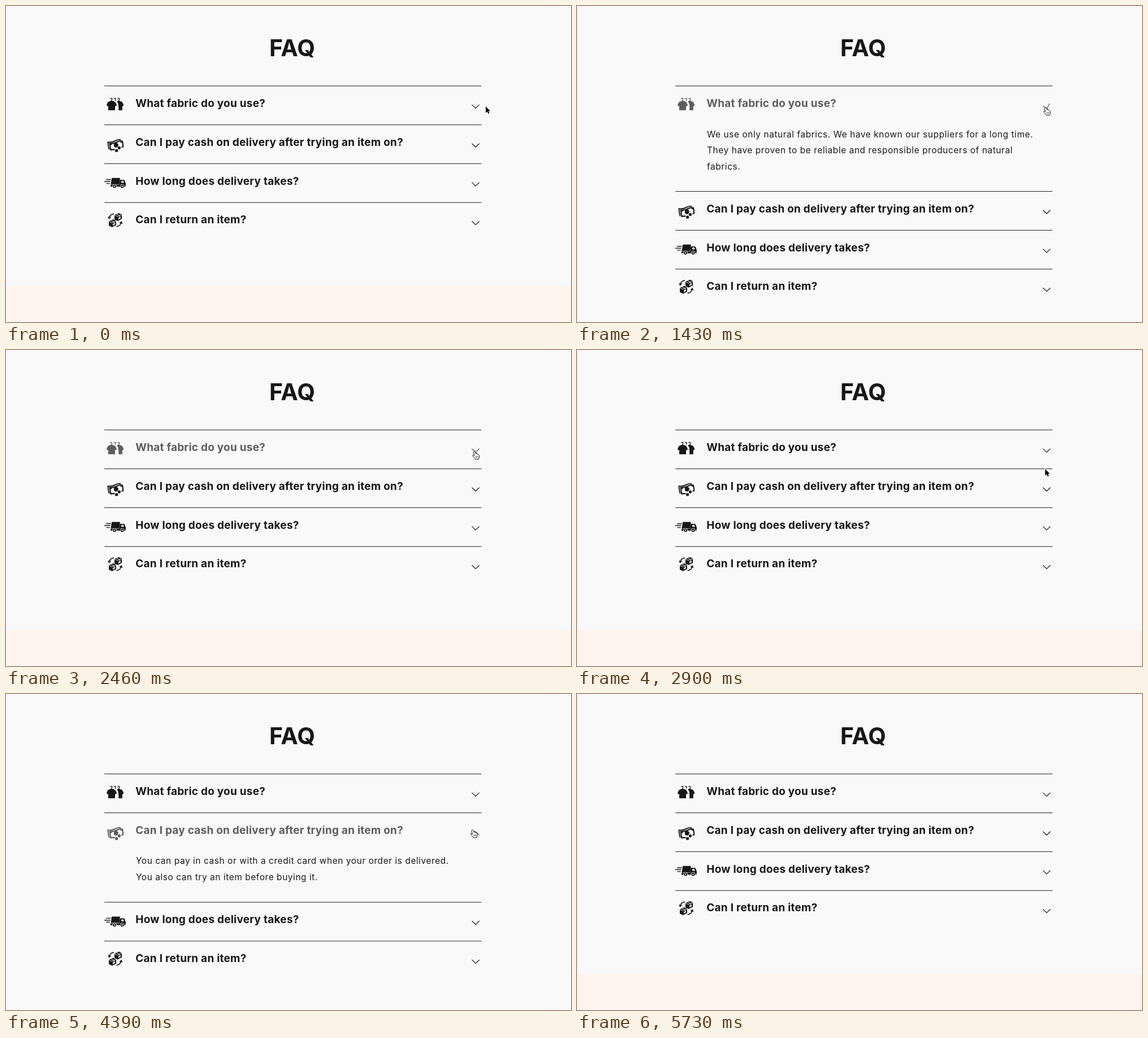
Write an HTML page that moves like this. It is 1000x560 px and loops after 6.24 s.

```html
<!DOCTYPE html>
<html lang="en">
<head>
<meta charset="utf-8">
<title>FAQ accordion</title>
<style>
  html, body { margin: 0; width: 100%; height: 100%; overflow: hidden; background: #f9f9f9; }
  svg { display: block; width: 1000px; height: 560px; }
  text { font-family: Inter, "Liberation Sans", sans-serif; font-optical-sizing: none; }
  .title { font-size: 41px; font-weight: 700; fill: #171717; }
  .question { font-size: 19px; font-weight: 700; letter-spacing: .23px; fill: currentColor; }
  .answer { font-size: 15.5px; letter-spacing: .54px; fill: #1a1a1a; }
  .icon { fill: currentColor; }
  .pen { fill: none; stroke: currentColor; }
  .cut { fill: #f9f9f9; }
  .cutPen { fill: none; stroke: #f9f9f9; }
  .chevron { fill: none; stroke: currentColor; stroke-width: 1.2; }
</style>
</head>
<body>
<svg viewBox="0 0 1000 560">
  <defs>
    <path id="hook" class="pen" stroke-width="1.3" d="M184.6 165a1.6 1.5 0 1 1 2.6 1.1l-.7 1.6"/>
    <g id="box">
      <path d="M0 3.4L7.6 0L13 2.6V10.2L5.6 14L0 11.2Z"/>
      <path class="cutPen" stroke-width=".9" d="M.4 3.8L5.5 6L12.6 3M3.8 2L9.4 4.4V7.2"/>
      <path class="cut" d="M7 8.2l3.8-1.8v2.8l-3.8 1.9z"/>
    </g>
    <g id="turn">
      <path class="pen" stroke-width="1.7" d="M191 368.3C186.6 368.8 184 371 183 374.8"/>
      <path d="M180.2 373.2l6 1.1l-4 3.8z"/>
    </g>
    <g id="wheel">
      <circle class="cut" r="3.8"/><circle r="3"/><circle class="cut" r="1.2"/>
    </g>

    <g id="icon0">
      <use href="#hook"/><use href="#hook" x="6.6"/><use href="#hook" x="13.2"/>
      <path d="M187 167.4l4.6 1.8q3 1 4.4 7.2l-3 1.4v7h-12v-7l-3-1.4q1.2-6.2 4.4-7.2z"/>
      <path d="M196.4 168.8l2.8-1.4 4.8 1.8q3 1 4.2 7.2l-2.4 1.4v7h-6.6v-7.4q-.3-5.4-2.8-8.6z"/>
    </g>
    <g id="icon1">
      <path class="pen" stroke-width="1.9" d="M182.6 254.4q-2-6.4-2.2-13.2q8 .8 13.4-2.6q4.6-2.4 9.4-1.4"/>
      <path class="pen" stroke-width="2.2" d="M193.6 255q-3.6-1.3-8.2 0q-1.4-6.4-1.6-11.4q7 .8 12.4-2.4q5-2.8 9.6-1.6q1.6 5 1.2 10l-2.6 .4"/>
      <path d="M185 246.4q3.2-.4 3.6-3l-4 .2zM201.6 240.4q1.4 2.4 4.6 1.6l-.6-2.6z"/>
      <circle cx="194.8" cy="246.8" r="4"/>
      <circle class="cut" cx="200.4" cy="251.4" r="3.5"/><circle cx="200.4" cy="251.4" r="2.6"/>
      <circle class="cut" cx="195.6" cy="256.2" r="3.4"/><circle cx="195.6" cy="256.2" r="2.6"/>
    </g>
    <g id="icon2">
      <path class="pen" stroke-width="1.4" d="M177 307.8h8.6M174 311.2h10.6M177.4 314.6h6.4"/>
      <path d="M187.2 304.8h14.6l-1.3 11.2h-15z"/>
      <path d="M185.2 316.6h15.4l1-8.6h6.4q1.8 0 2.3 1.8l.9 3 .9 2.2-.7 5.2h-26.6z"/>
      <path class="cut" d="M204.4 309.8h3.2l1.3 3.4h-5z"/>
      <use href="#wheel" x="192" y="319.6"/><use href="#wheel" x="205.6" y="319.6"/>
    </g>
    <g id="icon3">
      <use href="#box" x="192" y="367"/><use href="#box" x="182" y="378"/>
      <use href="#turn"/><use href="#turn" transform="rotate(180 193.3 379.6)"/>
    </g>
  </defs>

  <rect width="1000" height="560" fill="#f9f9f9"/>
  <rect id="band" y="496" width="1000" height="200" fill="#fff5ef"/>
  <text class="title" x="466" y="88.5">FAQ</text>
  <g id="rows"></g>
  <path id="arrow" d="M0 0V11.5L2.7 9L4.6 13L6.6 12.1L4.8 8.3H8.4Z" fill="#000" stroke="#fff" stroke-width="1.6" paint-order="stroke"/>
  <g id="hand" stroke="#111" stroke-linejoin="round">
    <path fill="#fff" d="M-1.6 1.4Q-1.4-.5 .2-.4Q1.4-.2 1.7 1.2L2.6 4.2Q4-.2 4.8 4.6Q6.2 4.2 6.8 5.4Q8.2 5.2 8.5 6.6Q9.2 9 8.4 11L7.6 13.6H1.6Q.4 11.6-1.6 9.4Q-3.8 7-2.6 6.2Q-1.6 5.8 0 7.4Z"/>
    <path fill="none" stroke-width=".8" d="M2.4 8.4l.3 2.6M4.3 8.4l.2 2.6M6.2 8.2v2.6"/>
  </g>
</svg>
<script>
const LOOP = 6240, PITCH = 68.85, SPIN = 200, OPEN_LAG = 40, FADE = 60;
const $ = id => document.getElementById(id);

// hover and spin: the times at which each state begins and ends
const items = [
  {
    question: 'What fabric do you use?',
    answer: ['We use only natural fabrics. We have known our suppliers for a long time.',
      'They have proven to be reliable and responsible producers of natural', 'fabrics.'],
    grow: 118, hover: [1030, 2600], spin: [1390, 2270]
  },
  {
    question: 'Can I pay cash on delivery after trying an item on?',
    answer: ['You can pay in cash or with a credit card when your order is delivered.',
      'You also can try an item before buying it.'],
    grow: 89.6, hover: [2970, 4935], spin: [3395, 4400]
  },
  { question: 'How long does delivery takes?' },
  { question: 'Can I return an item?' }
];

const home = { x: 849, y: 178 };
const moves = [
  { from: 100, to: 260, x: 829, y: 180 },
  { from: 2510, to: 2660, x: 829, y: 210 },
  { from: 2870, to: 3230, x: 825.5, y: 241 },
  { from: 4930, to: 5290, x: 919, y: 506 },
  { from: 5590, to: 5730, x: 950, y: 560 }
];
const exit = moves[moves.length - 1].to;

const texts = (cls, x, y, lines) => lines.map((s, i) =>
  `<text class="${cls}" x="${x}" y="${y + i * 28.8}">${s}</text>`).join('');

$('rows').innerHTML = items.map(({ question, answer = [] }, i) => {
  const drop = PITCH * i;
  return `<g class="row">
    <rect x="174" y="${141.2 + drop}" width="667.5" height="1" fill="#222"/>
    <g class="head">
      <use class="icon" href="#icon${i}"/>
      ${texts('question', 229.3, 178.8 + drop, [question])}
      <path class="chevron" d="M824.7 ${174.9 + drop}l6.5 6.3l6.6-6.3"/>
    </g>
    <g class="body">${texts('answer', 230, 232.6 + drop, answer)}</g>
  </g>`;
}).join('');

const rows = [...document.querySelectorAll('.row')].map(g => ({
  g,
  head: g.querySelector('.head'),
  body: g.querySelector('.body'),
  chevron: g.querySelector('.chevron')
}));

const ramp = (t, from, length) => Math.min(1, Math.max(0, (t - from) / length));
const smooth = k => k * k * (3 - 2 * k);
const within = (t, [from, to]) => t >= from && t < to;
const pulse = (t, [from, to], length) => smooth(ramp(t, from, length)) - smooth(ramp(t, to, length));
const show = (el, on) => el.setAttribute('visibility', on ? 'visible' : 'hidden');
const place = (el, x, y) => el.setAttribute('transform', `translate(${x} ${y})`);

// The pointer sets off sideways, then gathers speed downwards.
function pointerAt(t) {
  return moves.reduce((p, m) => {
    const k = ramp(t, m.from, m.to - m.from);
    return { x: p.x + (m.x - p.x) * k ** .8, y: p.y + (m.y - p.y) * k ** 1.4 };
  }, home);
}

function draw(t) {
  let shift = 0, hand = false;
  rows.forEach((row, i) => {
    const { hover = [0, 0], spin = [0, 0], grow = 0 } = items[i];
    const isOpen = within(t - OPEN_LAG, spin);
    const tone = Math.round(23 + 70 * pulse(t, hover, FADE));
    place(row.g, 0, shift);
    row.head.style.color = `rgb(${tone},${tone},${tone})`;
    row.chevron.setAttribute('transform',
      `rotate(${-180 * pulse(t, spin, SPIN)} 831.2 ${178 + PITCH * i})`);
    show(row.body, isOpen);
    if (isOpen) shift += grow;
    hand ||= within(t, hover);
  });
  place($('band'), 0, shift);

  const { x, y } = pointerAt(t);
  place($('hand'), x, y);
  place($('arrow'), x, y);
  show($('hand'), hand);
  show($('arrow'), !hand && t < exit);
}

const start = performance.now();
function tick() {
  draw((performance.now() - start) % LOOP);
  requestAnimationFrame(tick);
}
tick();
</script>
</body>
</html>
```
